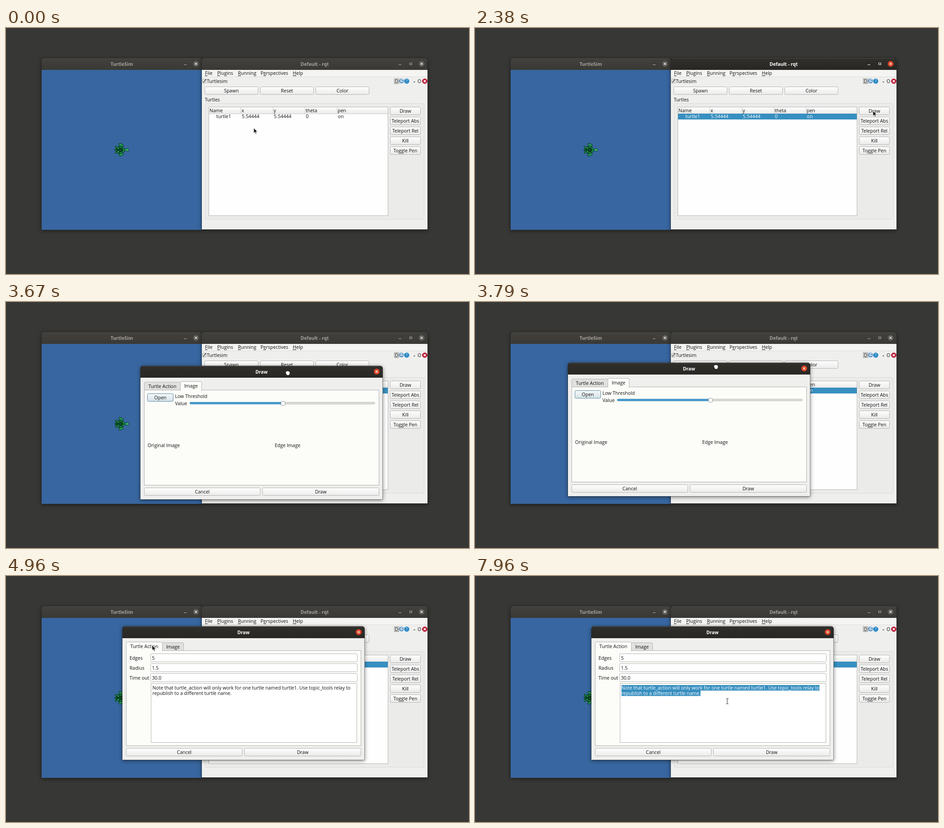
Recreate the animation shown at these times as an HTML page. Size 1026 by 546 pixels, loop 8000 ms.

```html
<!DOCTYPE html>
<html lang="en">
<head>
<meta charset="utf-8">
<title>Turtlesim drawing dialog</title>
<style>
html, body { margin: 0; width: 100%; height: 100%; overflow: hidden; background: #373735; }
svg { display: block; width: 100vw; height: 100vh; }
text { font: 10.5px "Open Sans", "Noto Sans", sans-serif; fill: #111; white-space: pre; }
text.title { font-size: 10.3px; font-weight: 700; fill: #a5a39e; }
.active > text.title { fill: #fff; }
.bar { fill: url(#barIdle); }
.active > .bar { fill: url(#barActive); }
.close { fill: #5c5b57; }
.active > .close { fill: #da4122; }
.sign { fill: none; stroke: #b5b3ae; }
.active > .sign { stroke: #fff; }
.cross { fill: none; stroke: #f2f2f0; stroke-width: 1.2; }
.shadow { filter: drop-shadow(0 2px 4px rgba(0, 0, 0, .45)); }
.selected text, text.selected { fill: #fff; }
u, .key { text-decoration: underline; }
</style>
</head>
<body>
<svg id="stage" viewBox="0 0 1026 546" xmlns="http://www.w3.org/2000/svg"></svg>
<script>
const FRAME = 1000 / 24, LOOP = 8000;
const NOTE = [
  'Note that turtle_action will only work for one turtle named turtle1. Use topic_tools relay to',
  'republish to a different turtle name.'
];

const rect = (x, y, w, h, fill, extra = '') =>
  `<rect x="${x}" y="${y}" width="${w}" height="${h}" fill="${fill}" ${extra}/>`;
const box = (x, y, w, h, fill, stroke, r = 0) =>
  rect(x + .5, y + .5, w - 1, h - 1, fill, `stroke="${stroke}" rx="${r}"`);
const label = (x, y, s, extra = '') => `<text x="${x}" y="${y}" ${extra}>${s}</text>`;
const centred = (x, y, s, extra = '') => label(x, y, s, `text-anchor="middle" ${extra}`);
const path = (d, extra = '') => `<path d="${d}" ${extra}/>`;
const button = (x, y, w, s, fill = 'url(#btn)', stroke = '#b4b4b3') =>
  box(x, y, w, 18, fill, stroke, 2) + centred(x + w / 2, y + 12.6, s);
const gradient = (id, a, b) =>
  `<linearGradient id="${id}" x2="0" y2="1"><stop stop-color="${a}"/><stop offset="1" stop-color="${b}"/></linearGradient>`;

function frame(x, y, w, h, title, fill, resizable, minimizable = true) {
  const cx = x + w - 13, cy = y + 12.5;
  const roof = `M${x} ${y + 26}v-20q0-6 6-6h${w - 12}q6 0 6 6v20z`;
  return path(`M${x} ${y + h}v${6 - h}q0-6 6-6h${w - 12}q6 0 6 6v${h - 6}z`, 'class="shadow" fill="#282825" stroke="#282825"') +
    rect(x, y + 26, w, h - 26, fill) + path(roof, 'class="bar"') +
    path(`M${x + 5} ${y + .5}h${w - 10}`, 'stroke="#4b4a46"') +
    centred(x + w / 2, y + 16.7, title, 'class="title"') +
    (minimizable ? path(`M${cx - (resizable ? 51 : 27)} ${y + 14.5}h6`, 'class="sign"') : '') +
    (resizable ? path(`M${cx - 26.5} ${y + 10.5}h5v4h-5z`, 'class="sign"') : '') +
    `<circle class="close" cx="${cx}" cy="${cy}" r="6.5"/>` +
    path(`M${cx - 2.5} ${cy - 2.5}l5 5m0-5l-5 5`, 'class="cross"');
}

function turtle() {
  const limb = (x, y, rx, ry, a) =>
    `<ellipse cx="${x}" cy="${y}" rx="${rx}" ry="${ry}" transform="rotate(${a} ${x} ${y})"/>`;
  return `<g fill="#25a35b" stroke="#06301a" stroke-width="1">
    ${limb(255, 259.5, 5.5, 2.4, 22)}${limb(255, 281, 5.5, 2.4, -22)}
    ${limb(244.5, 264.5, 3, 1.7, 35)}${limb(244.5, 276, 3, 1.7, -35)}
    ${path('M262 268.8h4q2-1.8 4.3-1 1.8 1 1.8 2.7t-1.8 2.7q-2.3.8-4.3-1h-4z', 'fill="#39b76c"')}
    ${path('M240.8 270.5l4-4.5 5-3.5h7l5.5 4.5 1.2 3.5-1.2 3.5-5.5 4.5h-7l-5-3.5z', 'fill="#1d8a4b"')}
    ${path('M249 270.5l3.5-4h4l3 4-3 4h-4zM252.5 266.5l-3-4M256.5 266.5l2-3M252.5 274.5l-3 4M256.5 274.5l2 3M249 270.5h-8M244.8 266l4.2 4.5-4.2 4.5', 'fill="#0c4a28" stroke-width="1.3"')}
  </g>`;
}

function simWindow() {
  return `<g>${frame(79, 67, 355, 381, 'TurtleSim', '#3866a0', false)}${turtle()}</g>`;
}

function toolWindow() {
  const key = (a, k, b) => `${a}<tspan class="key">${k}</tspan>${b}`;
  const menu = [[441, '', 'F', 'ile'], [468, '', 'P', 'lugins'], [514, '', 'R', 'unning'],
    [564, 'P', 'e', 'rspectives'], [635.5, '', 'H', 'elp']];
  const cells = ['Name', 'x', 'y', 'theta', 'pen'];
  const row = ['turtle1', '5.54444', '5.54444', '0', 'on'];
  const colX = i => 451 + i * 71;
  return `<g id="tool">${frame(434, 67, 500, 380, 'Default - rqt', '#efefee', true)}
    ${rect(434, 93, 500, 15, '#f4f4f3')}${rect(434, 108, 500, 1, '#dcdcdb')}
    ${menu.map(([x, ...s]) => label(x, 104.4, key(...s))).join('')}
    ${box(435, 113, 9, 10, '#e4e4e2', '#a8a8a6', 1)}
    ${path('M437 121l6.5-7.5', 'stroke="#4e4e4c" stroke-width="1.6"')}
    ${label(445, 122, 'Turtlesim')}
    ${box(860, 112, 11, 12, '#e2e2e1', '#8f8f8d')}${centred(865.6, 121.8, 'D')}
    <circle cx="876.5" cy="117.5" r="5.5" fill="#6b9fca"/>
    ${path('M879.5 113.5q-5 .5-4.5 5l5.5-.2', 'fill="none" stroke="#dfeaf3" stroke-width="1.7"')}
    <circle cx="888" cy="118" r="5.7" fill="#2b8ac6"/>
    ${centred(888, 121.3, '?', 'style="font-size:9px;fill:#d8ecf8"')}
    ${centred(905, 122, '-', 'style="font-weight:700"')}${centred(916, 122, 'O')}
    <circle cx="928" cy="118" r="5.8" fill="#b80f2a"/>
    ${path('M925.7 115.7l4.6 4.6m0-4.6l-4.6 4.6', 'stroke="#fff" stroke-width="1.8"')}
    ${['Spawn', 'Reset', 'Color'].map((s, i) => button(440 + i * 123, 130, 119, s)).join('')}
    ${label(440.5, 162.6, 'Turtles')}
    ${box(441, 167, 486, 258, '#ebebea', '#dadad9', 2)}
    ${box(449, 175, 398, 242, '#fefefe', '#b5b5b4')}
    ${rect(450, 176, 396, 14, 'url(#btn)')}${rect(450, 190, 396, 1, '#cbcbca')}
    ${cells.map((s, i) => label(colX(i), 186.8, s) + (i ? rect(colX(i) - 2, 176, 1, 14, '#cfcfce') : '')).join('')}
    <g id="row">${rect(450, 190, 396, 13, '#378fc0', 'id="rowFill"')}
    ${row.map((s, i) => label(i ? colX(i) + .6 : 466, 200.4, s)).join('')}</g>
    ${['Draw', 'Teleport Abs', 'Teleport Rel', 'Kill', 'Toggle Pen'].map((s, i) => button(851, 175 + i * 22, 68, s)).join('')}
  </g>`;
}

function tabs(first) {
  const tab = (x, w, s, on) => {
    const y = on ? 34 : 35.5;
    return path(`M${x + .5} ${on ? 55 : 53.5}V${y + 2.5}q0-2 2-2h${w - 5}q2 0 2 2V${on ? 55 : 53.5}`,
      `fill="${on ? '#fcfdf9' : '#e1e1df'}" stroke="#b4b4b2"`) + centred(x + w / 2, on ? 48.2 : 48.8, s);
  };
  const a = tab(8, 81, 'Turtle Action', first), b = tab(88, 48, 'Image', !first);
  const page = box(8, 53, 521, 212, '#fcfdf9', '#b0b0ae');
  return first ? b + page + a : a + page + b;
}

function dialog() {
  const fields = [['Edges', '5'], ['Radius', '1.5'], ['Time out', '30.0']];
  return `<g id="dialog" class="active">${frame(0, 0, 536.5, 296, 'Draw', '#efefee', false, false)}
    ${button(8, 270, 258, 'Cancel')}${button(270, 270, 259, 'Draw')}
    <g id="imagePage">${tabs(false)}
      ${button(15, 61, 58, 'Open', 'url(#focus)', '#5c88a2')}
      ${label(76.5, 70.8, 'Low Threshold')}${label(76.5, 87, 'Value')}
      ${box(109, 80, 411, 5, '#dededc', '#b9b9b7', 2)}${box(109, 80, 207, 5, '#4ba3d8', '#2f7cab', 2)}
      ${box(311, 78, 10, 10, '#fafafa', '#9c9c9a', 2)}
      ${label(15.8, 179.6, 'Original Image')}${label(297.5, 179.6, 'Edge Image')}
    </g>
    <g id="formPage">${tabs(true)}
      ${fields.map(([a, b], i) => label(15.8, 73.5 + i * 22, a) +
        box(62, 60 + i * 22, 459, 19, '#fff', '#b4b4b3', 2) + label(65.5, 73.5 + i * 22, b)).join('')}
      ${box(63, 126, 457, 132, '#fff', '#b5b5b4')}
      ${NOTE.map((s, i) => rect(66.5, 130 + i * 12, 0, 12.3, '#378fc0', 'class="mark"') +
        label(66.5, 140 + i * 12.2, s, 'class="note"')).join('')}
    </g></g>`;
}

function pointers() {
  return `<g id="pointer">
    ${path('M0 0V11.2L2.6 8.8 4.4 13 6.3 12.2 4.5 8.2H8Z', 'id="arrow" fill="#111" stroke="#f2f2f2" stroke-width=".8"')}
    ${path('M-4.5 0V-2.5q.2-1.4 1.7-1.1 .4-1.2 2-.8 1.2-.8 2.2.3 1.7-.4 1.9 1 1.4 0 1.4 1.5V1q0 1.7-1.4 2.4V5H-2.6V3Q-4.5 1.5-4.5 0Z', 'id="hand" fill="#fff" stroke="#161616" stroke-width=".8"')}
    <g id="beam" fill="none">${['#fff" stroke-width="2.4', '#2b2b2b'].map(c =>
      path('M-2.7-5.8H-.6L0-5.2.6-5.8H2.7M0-5.2V5.2M-2.7 5.8H-.6L0 5.2.6 5.8H2.7', `stroke="${c}"`)).join('')}</g>
  </g>`;
}

const stage = document.getElementById('stage');
stage.innerHTML = `<defs>${gradient('barIdle', '#42413d', '#3a3935')}${gradient('barActive', '#302f2c', '#282724')}
  ${gradient('btn', '#fefefe', '#ebebea')}${gradient('focus', '#f4f9fb', '#d6e1e6')}</defs>` +
  rect(0, 0, 1026, 546, '#373735') + simWindow() + toolWindow() + dialog() + pointers();

const $ = id => document.getElementById(id);
const show = (id, on) => $(id).setAttribute('visibility', on ? 'inherit' : 'hidden');
const notes = [...stage.querySelectorAll('.note')], marks = [...stage.querySelectorAll('.mark')];

// Keys are [tick, x, y]
const POINTER = [[0, 549, 222], [9, 549, 222], [10, 537, 217], [16, 537, 217], [17, 526, 208], [19, 513, 200],
  [31, 513, 200], [41, 620, 212], [47, 806, 204], [51, 888, 188], [57, 882, 184], [61, 882, 184],
  [71, 520, 125], [77, 310, 92], [81, 261, 85], [102, 615, 130], [110, 470, 142], [116, 340, 153], [119, 324, 154],
  [142, 324, 154], [148, 336, 210], [153, 333, 250], [157, 333, 250], [158, 329, 251], [161, 327, 250],
  [165, 327, 250], [166, 324.5, 249], [172, 324.5, 249], [180, 420, 252], [186, 515, 265], [191, 559, 278]];
const DRAG = [[0, -102, 67], [82, -102, 67], [88, 298, 142], [91, 206, 135], [92, 177, 126],
  [94, 160, 121], [99, 260, 118], [102, 258, 112]];

function at(keys, n, step) {
  const i = keys.findIndex(k => k[0] > n);
  if (i < 0) return keys[keys.length - 1].slice(1);
  const [n0, x0, y0] = keys[i - 1], [n1, x1, y1] = keys[i];
  const u = Math.floor((n - n0) / step) * step / (n1 - n0);
  return [x0 + (x1 - x0) * u, y0 + (y1 - y0) * u];
}

function selectNote(x, y, on) {
  const second = y > 254;
  notes.forEach((el, i) => {
    const full = el.getComputedTextLength();
    const reach = Math.max(0, Math.min(full, x - 324.5));
    const w = !on || (i && !second) ? 0 : !i && second ? full : reach;
    marks[i].setAttribute('width', w);
    el.classList.toggle('selected', w > full / 2);
  });
}

function draw(time) {
  const n = Math.floor((time % LOOP + 4) / FRAME);
  const dragging = n >= 83 && n <= 102;
  const [dx, dy] = at(DRAG, n, 1);
  let [x, y] = at(POINTER, n, 2);
  if (dragging) {
    [x, y] = at(DRAG, n + 1, 1);
    x += 357;
    y += 18;
  }
  const form = n >= 119, beam = n >= 146;

  $('tool').classList.toggle('active', n >= 23 && n < 63);
  $('row').classList.toggle('selected', n >= 23);
  show('rowFill', n >= 23);
  show('dialog', n >= 63);
  show('imagePage', !form);
  show('formPage', form);
  $('dialog').setAttribute('transform', `translate(${Math.round(dx)} ${Math.round(dy)})`);
  $('pointer').setAttribute('transform', `translate(${x} ${y})`);
  show('arrow', !dragging && !beam);
  show('hand', dragging);
  show('beam', beam);
  selectNote(x, y, n >= 174);
}

const start = performance.now();
function tick() {
  draw(performance.now() - start);
  requestAnimationFrame(tick);
}
tick();
</script>
</body>
</html>
```
